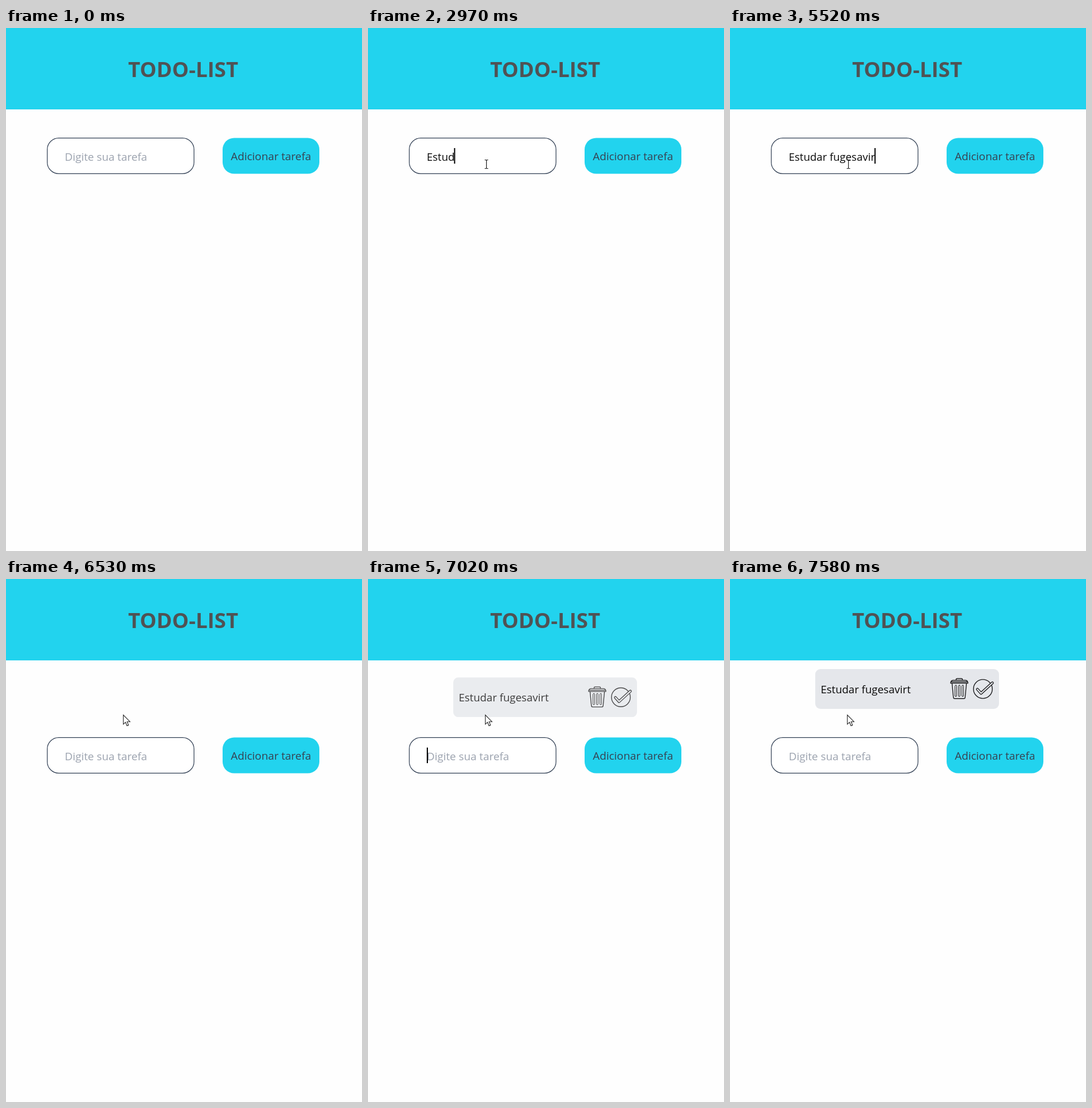
An HTML page that plays this animation: 618x906 px, repeating every 8 s.

```html
<!DOCTYPE html>
<html lang="pt-BR">
<head>
<meta charset="utf-8">
<title>Todo list</title>
<style>
  html, body { margin: 0; width: 100%; height: 100%; overflow: hidden; background: #fefefe; }
  svg { display: block; width: 100%; height: 100%; }
  text { font: 18.8px "Open Sans", "Noto Sans", sans-serif; white-space: pre; }
  .title { font-size: 36.5px; font-weight: 700; fill: #505254; text-anchor: middle; }
  .hint { fill: #9ca3af; }
  .typed { font-size: 18.5px; fill: #0a0a0a; }
  .label { fill: #374151; text-anchor: middle; }
  .icon { fill: none; stroke: #1c1c1e; stroke-width: 1.4; stroke-linecap: round; stroke-linejoin: round; }
</style>
</head>
<body>
<svg viewBox="0 0 618 906">
  <rect width="618" height="141" fill="#22d3ee"/>
  <text class="title" x="307.5" y="85">TODO-LIST</text>

  <g id="form">
    <rect x="71.6" y="190.6" width="254.8" height="61.8" rx="20" fill="#fff" stroke="#334155" stroke-width="1.2"/>
    <text id="hint" class="hint" x="102" y="230">Digite sua tarefa</text>
    <text id="typed" class="typed" x="102" y="230"></text>
    <rect id="caret" y="208" width="2" height="27"/>
    <rect x="376" y="190.5" width="168" height="62" rx="20" fill="#22d3ee"/>
    <text class="label" x="460" y="229">Adicionar tarefa</text>
  </g>

  <g id="card">
    <rect x="148" y="156" width="319" height="69" rx="9" fill="#e5e7eb"/>
    <text id="task" class="typed" x="157.5" y="198"></text>
    <g class="icon">
      <path d="M392.5 175V174Q392.5 172.5 394 172.5H402Q403.5 172.5 403.5 174V175"/>
      <path d="M383 180.5Q383 176 387 175.5H409Q413 176 413 180.5Z M384.5 178.3H411.5"/>
      <path d="M385.5 181L387.8 205Q388 207.3 390.2 207.3H405.8Q408 207.3 408.2 205L410.5 181"/>
      <rect x="390.6" y="184" width="2.8" height="19.5" rx="1.4" stroke-width="1"/>
      <rect x="396.6" y="184" width="2.8" height="19.5" rx="1.4" stroke-width="1"/>
      <rect x="402.6" y="184" width="2.8" height="19.5" rx="1.4" stroke-width="1"/>
      <circle cx="439" cy="190.5" r="16.4"/>
      <path d="M429.5 191L435.8 198L455.5 180" stroke-width="4.8"/>
      <path d="M429.5 191L435.8 198L455.5 180" stroke="#e5e7eb" stroke-width="2.2"/>
    </g>
  </g>

  <path id="arrow" d="M0 0V16L3.8 12.6L6.3 18.6L9 17.5L6.5 11.6H11.5Z" fill="#fff" stroke="#222" stroke-width="1.1"/>
  <path id="beam" d="M-3 -7.5H-1L0 -6.5L1 -7.5H3M0 -6.5V6.5M-3 7.5H-1L0 6.5L1 7.5H3" fill="none" stroke="#222" stroke-width="1.2"/>
</svg>
<script>
const LOOP = 8000, FRAME = 70, ADDED = 6530;
const TASK = "Estudar fugesavirt";
const KEY_TIMES = [2160, 2360, 2710, 2840, 2970, 3170, 3440, 3840, 4040, 4110,
                   4440, 4510, 4780, 5050, 5250, 5320, 5520, 5930];
const CARET_ON = [[900, 1430], [1980, 6460], [7020, 7510]];

const [form, hint, typed, caret, card, task, arrow, beam] =
  ["form", "hint", "typed", "caret", "card", "task", "arrow", "beam"].map(id => document.getElementById(id));

const show = (el, on) => { el.style.display = on ? "" : "none"; };
const place = (el, x, y) => el.setAttribute("transform", `translate(${x} ${y})`);

task.textContent = TASK;
const rise = card.animate(
  [{ opacity: 0, transform: "translateY(69px)" }, { opacity: 1, transform: "translateY(0px)" }],
  { duration: 1000, easing: "ease", fill: "both" });
rise.pause();

function drawPointer(t) {
  const step = Math.min(11, Math.floor(t / FRAME));
  const left = 1 - Math.max(0, step - 1) / 10;
  const away = left * left;
  const added = t >= ADDED;
  const overField = step === 11 && !added;
  const nudged = t >= 900 && t < 970;
  show(arrow, step > 0 && !overField);
  show(beam, overField);
  place(arrow, 203.7 + 363 * away, 235.6 + 660 * away);
  place(beam, nudged ? 213.5 : 205.6, nudged ? 242 : 236);
}

function draw(t) {
  const added = t >= ADDED;
  const count = added ? 0 : KEY_TIMES.filter(k => k <= t).length;
  typed.textContent = TASK.slice(0, count);
  show(hint, count === 0);
  show(caret, CARET_ON.some(([from, to]) => t >= from && t < to));
  caret.setAttribute("x", 102 + (count ? typed.getComputedTextLength() - 1 : 0));
  place(form, 0, added ? 84 : 0);
  show(card, added);
  rise.currentTime = added ? Math.min(1000, Math.floor((t - ADDED) / FRAME) * FRAME) : 0;
  drawPointer(t);
}

const start = performance.now();
function tick() {
  draw((performance.now() - start) % LOOP);
  requestAnimationFrame(tick);
}
tick();
</script>
</body>
</html>
```
